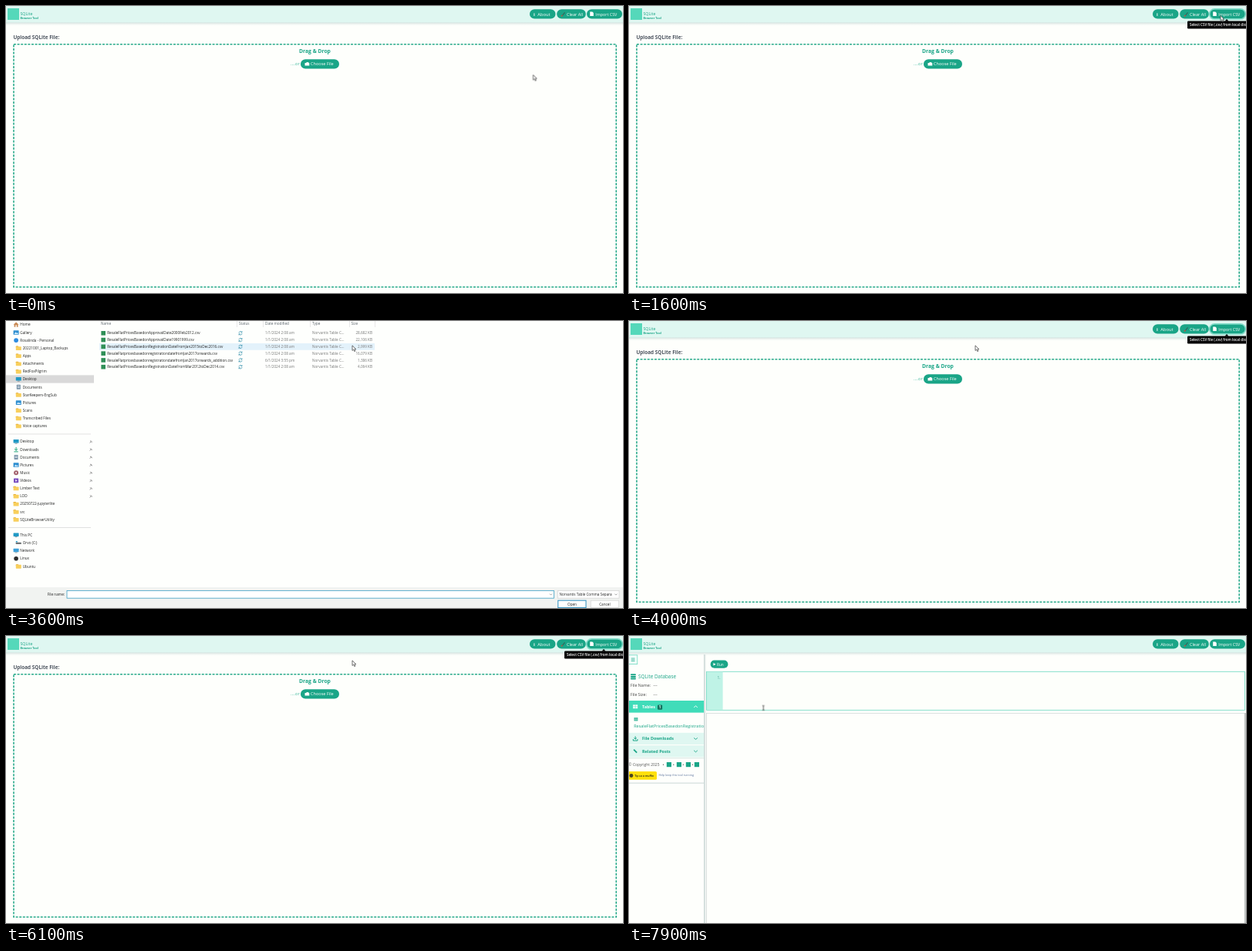
An HTML page that plays this animation: 800 by 373 pixels, repeating every 8000 ms.

```html
<!DOCTYPE html>
<html lang="en">
<head>
<meta charset="utf-8">
<title>SQLite Browser Tool</title>
<style>
html, body { margin: 0; width: 100%; height: 100%; overflow: hidden; background: #fefffc; }
svg { display: block; width: 100vw; height: 100vh; }
text { font-family: "Open Sans", "Noto Sans", sans-serif; white-space: pre; }
.bold { font-weight: 700; }
.semi { font-weight: 600; }
#home, #dialog, #work, #focus, #hover, #arrow, #beam { animation: 8s step-end infinite; }
#home { animation-name: home; }
#dialog { animation-name: dialog; }
#work { animation-name: work; }
#focus { animation-name: focus; }
#hover { animation-name: hover; }
#arrow { animation-name: arrow; }
#beam { animation-name: beam; }
#cursor { animation: move 8s ease-in-out infinite; }
@keyframes home {
  0%, 47.5% { visibility: visible; }
  21%, 85%, 100% { visibility: hidden; }
}
@keyframes dialog {
  0%, 47.5%, 100% { visibility: hidden; }
  21% { visibility: visible; }
}
@keyframes work {
  0% { visibility: hidden; }
  85%, 100% { visibility: visible; }
}
@keyframes focus {
  0%, 85%, 100% { opacity: 0; }
  12% { opacity: 1; }
}
@keyframes hover {
  0% { opacity: 0; }
  39.3%, 100% { opacity: 1; }
}
@keyframes arrow {
  0% { opacity: 1; }
  90%, 100% { opacity: 0; }
}
@keyframes beam {
  0% { opacity: 0; }
  90%, 100% { opacity: 1; }
}
@keyframes move {
  0%, 3% { transform: translate(683.5px, 89.5px); }
  12%, 22% { transform: translate(767px, 12.5px); }
  27.5%, 29% { transform: translate(700.8px, 68.3px); }
  42%, 87% { transform: translate(449px, 31.8px); }
  96.5%, 100% { transform: translate(174.3px, 93.5px); }
}
</style>
</head>
<body>
<svg id="stage" viewBox="0 0 800 373">
  <defs>
    <linearGradient id="shade" x2="0" y2="1">
      <stop stop-color="#d3e0de"/>
      <stop offset="1" stop-color="#fefffc" stop-opacity="0"/>
    </linearGradient>
  </defs>
</svg>
<script>
const TEAL = "#1aa587", MINT = "#40dcb9", PALE = "#dff7f1", INK = "#222", GREY = "#777";

const rect = (x, y, w, h, fill, extra = "") =>
  `<rect x="${x}" y="${y}" width="${w}" height="${h}" fill="${fill}" ${extra}/>`;
const path = (d, stroke, width = 0.8, fill = "none") =>
  `<path d="${d}" fill="${fill}" stroke="${stroke}" stroke-width="${width}"/>`;
const circle = (x, y, r, fill) => `<circle cx="${x}" cy="${y}" r="${r}" fill="${fill}"/>`;
// y is the middle of the line of text
const text = (x, y, size, fill, str, extra = "") =>
  `<text x="${x}" y="${y + size * 0.36}" font-size="${size}" fill="${fill}" ${extra}>${str}</text>`;
const group = (id, ...parts) => `<g id="${id}">${parts.join("")}</g>`;
const at = (x, y, body) => `<g transform="translate(${x} ${y})">${body}</g>`;
const bold = 'class="bold"', semi = 'class="semi"', middle = 'text-anchor="middle"';
const stroked = (color, width = 0.8) => `stroke="${color}" stroke-width="${width}"`;

const pill = (x, y, w, h) => rect(x, y, w, h, TEAL, `rx="${h / 2}"`);
const sheet = (x, y) => path(`M${x} ${y}h3l1.6 1.6v4h-4.6z`, "none", 0, "#fff");

function header() {
  return [
    rect(0, 0, 800, 22, PALE),
    rect(0, 21.5, 800, 5, "url(#shade)"),
    rect(2, 3, 15, 15, "#55d8ba"),
    text(18.4, 9.7, 5.3, TEAL, "SQLite"),
    text(18.4, 15.4, 3.65, TEAL, "Browser Tool", bold),
    pill(679, 4.2, 33.5, 12.4),
    text(684, 10.4, 6, "#fff", "i", bold),
    text(689.3, 10.6, 5.8, "#fff", "About"),
    pill(714.2, 4.2, 37.6, 12.4),
    path("M721 12.8l3.6-4.4", "#33665d", 1.2),
    path("M720 13.4l1.6-1.4", "#b95848", 1.4),
    text(727, 10.6, 5.5, "#fff", "Clear All"),
    pill(753, 4.2, 46, 12.4),
    sheet(757.2, 7.4),
    text(764.3, 10.6, 5.36, "#fff", "Import CSV")
  ].join("");
}

function home() {
  return group("home",
    header(),
    text(9.4, 40.6, 6.42, "#4d5560", "Upload SQLite File:", bold),
    rect(10, 49.8, 781.2, 315.4, "none", stroked("#2bab8c", 1.6) + ' stroke-dasharray="3 1.6"'),
    text(400.5, 58.6, 6.75, TEAL, "Drag &amp; Drop", bold + middle),
    text(369, 75.2, 5.7, "#3bb79b", "....or"),
    pill(382, 69.2, 50, 12.4),
    path("M387.5 74h1.6l.8-1h2l.8 1h.6v3.6h-5.8z", "none", 0, "#fff"),
    text(395, 75.4, 5.58, "#fff", "Choose File"),
    group("focus",
      rect(752.6, 3.8, 46.8, 13.2, "none", 'rx="6.6" ' + stroked("#7fdcc8", 1.6)),
      path("M772.5 19.8l2.5-2.8 2.5 2.8z", "none", 0, "#000"),
      rect(724, 19.5, 80, 10, "#050505", 'rx="1.2"'),
      text(727, 24.5, 4.5, "#fff", "Select CSV file (.csv) from local disk", semi))
  );
}

const monitor = color => rect(0, -2.8, 7, 4.6, color, 'rx=".5"') + rect(2, 2, 3, 0.8, "#6b7f8c");
const page = rect(1, -3, 5, 6, "#7893a8", 'rx=".5"') + rect(2, -1.4, 3, 0.7, "#fff") + rect(2, 0.2, 3, 0.7, "#fff");
const icons = {
  folder: rect(0, -2.7, 3.4, 2, "#e2a72d", 'rx=".5"') + rect(0, -2, 7, 4.8, "#f8cf5c", 'rx=".6"'),
  home: path("M0 0l3.5-3.2L7 0H6v3H1V0z", "none", 0, "#c98a55") + rect(2.7, 0.6, 1.6, 2.4, "#fff"),
  picture: rect(0, -2.8, 7, 5.6, "#2f8fd0", 'rx=".6"') + path("M1 2l2-2.6L4.2 1l1-1L6.4 2z", "none", 0, "#d6efff"),
  dot: circle(3.5, 0, 2.9, "#2b8be0"),
  desk: monitor("#2199c4"),
  page,
  down: path("M3.5-3V1.4M1.4-.6l2.1 2 2.1-2M.8 3h5.4", "#21a67a", 1),
  music: circle(3.5, 0, 3, "#a4636f") + circle(3.5, 0, 1, "#fff"),
  video: rect(0.4, -2.8, 6.2, 5.6, "#7a4fc0", 'rx=".6"') + path("M2.7-1.3l2.3 1.3-2.3 1.3z", "none", 0, "#fff"),
  drive: rect(0, -0.6, 7, 2.2, "#6f7477", 'rx=".4"') + rect(0, -2.4, 2, 1.5, "#2199c4"),
  net: monitor("#3b9fd8"),
  round: circle(3.5, 0, 2.8, "#2c2c2c")
};

// icon, label, indent, pinned; null is a dividing line
const places = [
  ["home", "Home"], ["picture", "Gallery"], ["dot", "Rosalinda - Personal"],
  ["folder", "20221001_Laptop_Backups", 1], ["folder", "Apps", 1], ["folder", "Attachments", 1],
  ["folder", "RedFoxPilgrim", 1], ["desk", "Desktop", 1], ["page", "Documents", 1],
  ["folder", "StarKeepers-EngSub", 1], ["picture", "Pictures", 1], ["folder", "Scans", 1],
  ["folder", "Transcribed Files", 1], ["folder", "Voice captures", 1], null,
  ["desk", "Desktop", 0, 1], ["down", "Downloads", 0, 1], ["page", "Documents", 0, 1],
  ["picture", "Pictures", 0, 1], ["music", "Music", 0, 1], ["video", "Videos", 0, 1],
  ["folder", "Limber Text", 0, 1], ["folder", "LOD", 0, 1], ["folder", "20250722-jupyterlite"],
  ["folder", "src"], ["folder", "SQLiteBrowserUtility"], null,
  ["desk", "This PC"], ["drive", "Orvo (C:)", 1], ["net", "Network"], ["round", "Linux"],
  ["folder", "Ubuntu", 1]
];

function place(item, i) {
  const y = 4.8 + 10.13 * i;
  if (!item) return rect(3, y, 107, 0.7, "#d5d5d5");
  const [icon, label, indent = 0, pinned] = item;
  const pin = path(`M108.6 ${y + 1.8}l1.4-1.5m-.9-1.3l2.2 2.2m-1.5-2.6l2 2`, "#777", 0.7);
  return at(9.6 + indent * 3.2, y, icons[icon]) +
    text(18.3 + indent * 3.4, y, 4.68, INK, label) + (pinned ? pin : "");
}

const files = [
  ["PricesBasedonApprovalDate2000Feb2012", "28,682"],
  ["PricesBasedonApprovalDate19901999", "22,106"],
  ["PricesBasedonRegistrationDateFromJan2015toDec2016", "2,999"],
  ["pricesbasedonregistrationdatefromJan2017onwards", "16,079"],
  ["pricesbasedonregistrationdatefromJan2017onwards_addition", "1,386", "6/1/2024 3:55 pm"],
  ["PricesBasedonRegistrationDateFromMar2012toDec2014", "4,064"]
];
const rowY = i => 15.8 + 8.78 * i;

function fileRow([name, size, date = "1/1/2024 2:08 am"], i) {
  const y = rowY(i), s = 4.66;
  return rect(123.4, y - 2.8, 5.6, 5.6, "#2f8f57") +
    text(131.2, y, s, INK, `ResaleFlat${name}.csv`) +
    path(`M302 ${y - 0.3}a2 2 0 0 1 3.8-.8m.2 1.4a2 2 0 0 1-3.8.8M306 ${y - 2.6}v1.6h-1.6M302 ${y + 2.6}v-1.6h1.6`, "#2b8ca8", 0.7) +
    text(336, y, s, GREY, date) +
    text(397, y, s, GREY, "Norvantis Table C...") +
    text(475, y, s, GREY, size + " KB", 'text-anchor="end"');
}

function dialog() {
  const columns = [[123, "Name"], [302, "Status"], [336, "Date modified"], [397, "Type"], [447.5, "Size"]];
  return group("dialog",
    rect(0, 0, 800, 373, "#fefffd"),
    rect(0, 70.4, 114, 10.2, "#d9d9d9"),
    ...places.map(place),
    ...columns.map(([x, label]) => text(x, 3, 4.66, "#5c646c", label)),
    ...[299, 333, 394, 445, 478].map(x => rect(x, 0, 0.7, 8, "#dedede")),
    group("hover", rect(121, rowY(2) - 4.4, 357, 8.8, "#e3f2fb")),
    ...files.map(fileRow),
    rect(0, 346, 800, 27, "#f1f3f1"),
    text(76, 355.3, 4.66, INK, "File name:", 'text-anchor="end"'),
    rect(79, 350.4, 631.4, 9.8, "#fff", stroked("#3f9fc4")),
    path("M705 354.6l1.5 1.5 1.5-1.5", "#666", 0.6),
    rect(715.4, 350.4, 79.6, 9.8, "#fff", stroked("#d2d2d2", 0.7)),
    text(717.5, 355.3, 4.66, INK, "Norvantis Table Comma Separa"),
    path("M789.3 354.6l1.5 1.5 1.5-1.5", "#666", 0.6),
    rect(715.8, 363.2, 36.2, 9.4, "#fff", stroked("#2d8fc0", 1)),
    text(734, 367.9, 4.66, INK, "Open", middle),
    rect(758.2, 363.2, 36.4, 9.4, "#fff", stroked("#d2d2d2", 0.7)),
    text(776.4, 367.9, 4.66, INK, "Cancel", middle)
  );
}

const chevron = (y, up) => path(`M84.2 ${y + up}l2.3 ${-2 * up} 2.3 ${2 * up}`, up > 0 ? "#fff" : TEAL, 0.9);
const section = (y, label) =>
  rect(0, y, 97, 15.2, PALE) + text(17, y + 7.6, 5.45, TEAL, label, bold) + chevron(y + 7.6, -1);

function work() {
  return group("work",
    header(),
    rect(97, 24, 2.4, 349, "#e2e8e7"),
    rect(97, 24, 0.7, 349, "#c3d3d0"),
    rect(-1, 24.8, 11.8, 11.8, "#f2fffb", stroked("#6fd9c0")),
    path("M2.8 29h4.8m-4.8 1.8h4.8m-4.8 1.8h4.8", TEAL, 0.7),
    ...[49.2, 51.9, 54.6].map(y => rect(2, y, 7, 2, TEAL, 'rx="1"')),
    text(12, 52.5, 6.4, TEAL, "SQLite Database"),
    text(2, 64, 5.3, "#444", "File Name:"), text(31.5, 64, 5.3, "#444", "---"),
    text(2, 75.6, 5.3, "#444", "File Size:"), text(31.5, 75.6, 5.3, "#444", "---"),
    rect(0, 84, 97, 15.6, MINT),
    rect(5.2, 89.4, 6, 4.8, "#fff"),
    path("M5.2 91.8h6m-3-2.4v4.8", MINT, 0.5),
    text(17, 92.2, 5.4, "#fff", "Tables", bold),
    rect(37, 89.4, 6.2, 6.4, "#15735f", 'rx="1.2"'),
    text(40.1, 92.6, 4.4, "#fff", "1", bold + middle),
    chevron(91.8, 1),
    rect(6.6, 106, 4.8, 4.4, "#40b79c"),
    path("M6.6 108.2h4.8m-2.4-2.2v4.4", "#c9f2e8", 0.4),
    `<svg width="97" height="373">${text(6.2, 117.2, 5.5, TEAL, "ResaleFlatPricesBasedonRegistrationDate")}</svg>`,
    section(125.8, "File Downloads"),
    path("M8.2 130.4v3.6m-1.7-1.5l1.7 1.6 1.7-1.6M5.4 134v2h5.6v-2", TEAL, 1),
    section(142.2, "Related Posts"),
    path("M6.2 147.6l4 4", TEAL, 1.8),
    rect(0, 158.4, 97, 0.8, "#cfe0dc"),
    text(-0.4, 167.2, 4.9, "#555", "© Copyright 2025"),
    ...[44.5, 57.8, 70.3, 82.4].map(x => circle(x, 167.2, 0.7, "#666")),
    ...[48.8, 61.8, 73.8, 84.8].map(x => rect(x, 164, 6.2, 6.2, TEAL)),
    rect(-1, 176, 37, 10.8, "#ffe00a", 'rx="1.6"'),
    circle(3, 181.5, 2.4, "#4a4420"),
    text(7.2, 181.4, 3.5, INK, "Tip us a muffin", semi),
    text(38.5, 181.2, 3.6, "#59709a", "Help keep this tool running"),
    rect(0, 190.6, 97, 1, "#cbd8d6"),
    pill(105.6, 31.6, 22.8, 10.2),
    path("M109.4 35l3.2 1.8-3.2 1.8z", "none", 0, "#fff"),
    text(114, 36.9, 4.7, "#fff", "Run"),
    rect(100.6, 46.3, 697.8, 50, "#fdfffb", stroked("#6bd9c0")),
    rect(101, 46.7, 20.6, 49.2, "#bff3e6"),
    text(114.4, 54.3, 4.8, "#3f9f8b", "1."),
    rect(100, 100, 698, 0.7, "#cfd6d4"),
    rect(100, 100, 0.7, 273, "#cfd6d4"),
    rect(797.8, 100, 2.2, 273, "#c2c5c4")
  );
}

const cursor = group("cursor",
  group("arrow", path("M0 0v6.6l1.6-1.4 1.1 2.5 1.2-.5-1.1-2.4h2z", "#333", 0.7, "#fff")),
  group("beam", path("M-1.4-3h1l.4.4.4-.4h1M0-2.6v5.2M-1.4 3h1l.4-.4.4.4h1", "#333", 0.8)));

document.getElementById("stage").insertAdjacentHTML("beforeend", home() + dialog() + work() + cursor);
</script>
</body>
</html>
```
